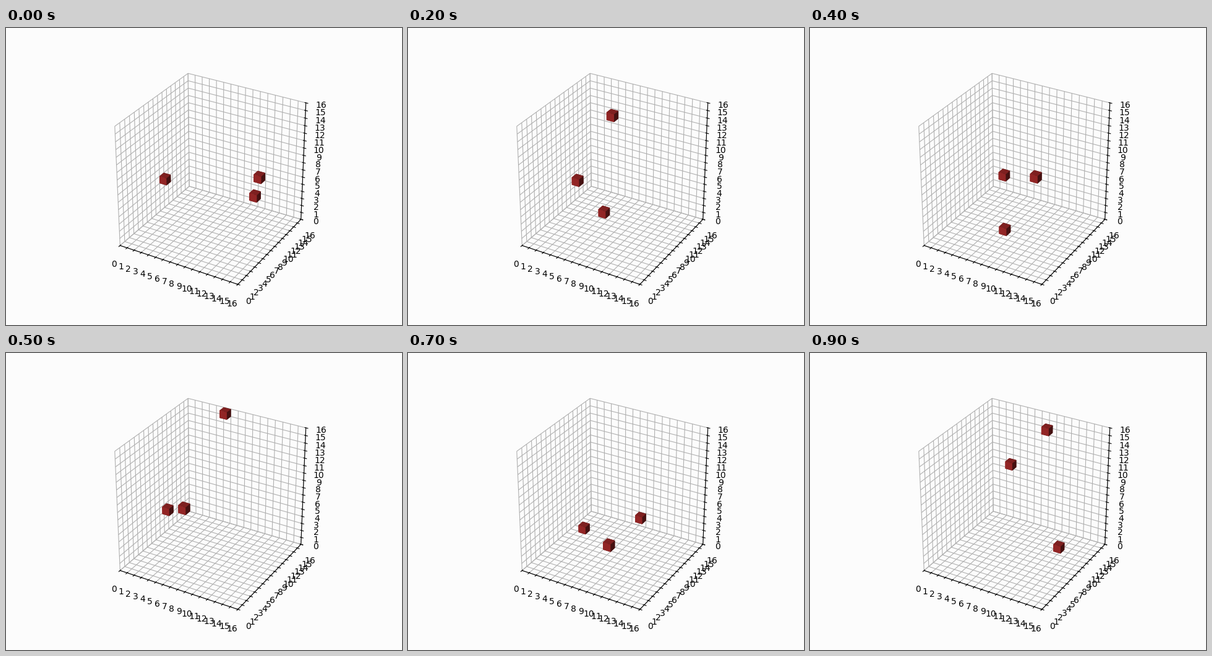
Recreate the animation shown at these times as a matplotlib script. Size 640 px wide and 480 px high, loop 1000 ms.

```python
import numpy as np
import matplotlib.pyplot as plt
from matplotlib.animation import FuncAnimation

SIZE = 16
BACKGROUND = "#fcfcfc"

# Lit cells (x, y, z) of the grid, one row per step.
STEPS = [
    [(0, 9, 4), (13, 9, 8), (13, 8, 6)],
    [(1, 4, 9), (9, 7, 4), (6, 11, 10)],
    [(7, 8, 15), (4, 5, 7), (7, 6, 3)],
    [(7, 13, 14), (9, 10, 5), (13, 13, 3)],
    [(5, 9, 6), (11, 6, 9), (8, 4, 2)],
    [(5, 15, 15), (1, 8, 4), (7, 2, 9)],
    [(15, 7, 8), (10, 6, 0), (13, 3, 1)],
    [(3, 8, 2), (7, 15, 1), (10, 2, 5)],
    [(14, 13, 11), (6, 8, 7), (10, 5, 3)],
    [(8, 14, 14), (3, 14, 8), (12, 10, 1)],
]

fig = plt.figure(figsize=(6.4, 4.8), dpi=100, facecolor=BACKGROUND)
ax = fig.add_subplot(projection="3d", facecolor=BACKGROUND)
ax.set(xlim=(0, SIZE), ylim=(0, SIZE), zlim=(0, SIZE))
ax.set_box_aspect((1, 1, 1))
for axis in (ax.xaxis, ax.yaxis, ax.zaxis):
    axis.set_ticks(np.arange(SIZE + 1))
    axis.set_pane_color((1, 1, 1, 0))


def draw(step):
    for cube in list(ax.collections):
        cube.remove()
    filled = np.zeros((SIZE, SIZE, SIZE), dtype=bool)
    for cell in STEPS[step]:
        filled[cell] = True
    return list(ax.voxels(filled, facecolors="brown").values())


anim = FuncAnimation(fig, draw, frames=len(STEPS), interval=100,
                     init_func=lambda: draw(0), repeat=True, repeat_delay=0)
plt.show()
```
